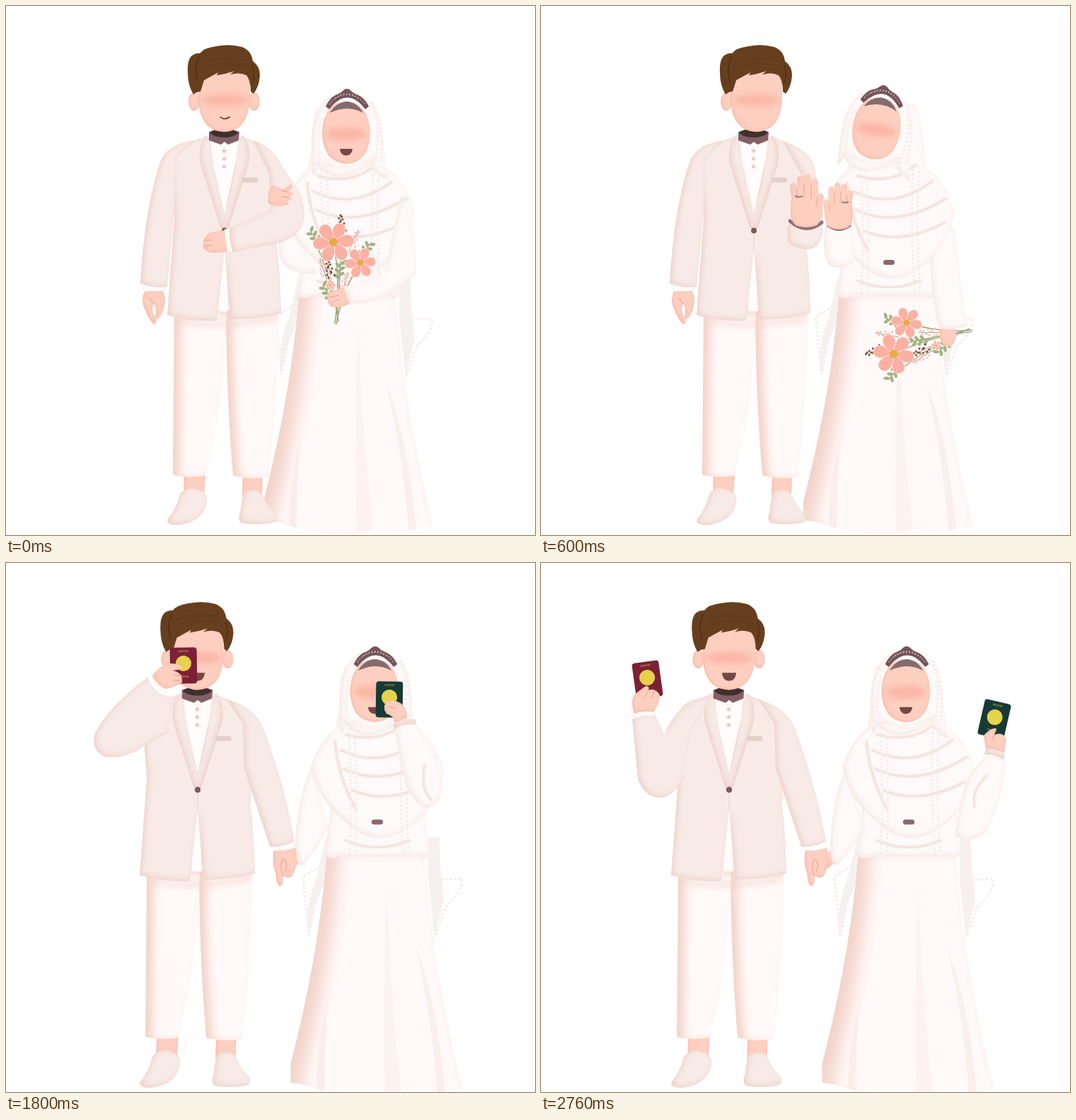
These frames come from a looping animation (748 px wide and 748 px high, 3 s). An HTML page:

```html
<!DOCTYPE html>
<html lang="en">
<head>
<meta charset="utf-8">
<title>Wedding couple</title>
<style>
html, body { margin: 0; width: 100%; height: 100%; overflow: hidden; background: #fff; }
svg { display: block; width: 100vw; height: 100vh; }
.suit { fill: #f8ebe7; filter: url(#suit); }
.pants { fill: #fffaf9; filter: url(#pants); }
.dress { fill: #fffaf9; filter: url(#dress); }
.gown { fill: #fefaf9; filter: url(#gown); }
.skin { fill: #fdcfc0; filter: url(#skin); }
.white { fill: #fffcfb; stroke: #f5e4df; stroke-width: .8; }
.fold { fill: none; stroke: #f3ded8; stroke-width: 3.5; stroke-linecap: round; filter: url(#haze); }
.lace { fill: none; stroke: #f5efed; stroke-width: 4; stroke-linecap: round; stroke-dasharray: 0 6; }
.line { fill: none; stroke: #f0ad9a; stroke-width: 1.3; stroke-linecap: round; }
.blush { fill: #f9a592; opacity: .6; filter: url(#soft); }
.mouth { fill: #764746; }
.gold { fill: #e6d24b; font: 3.6px Inter, sans-serif; text-anchor: middle; }
</style>
</head>
<body>
<svg id="stage" viewBox="0 0 748 748"></svg>
<script>
const path = (kind, d) => `<path class="${kind}" d="${d}"/>`;
const fill = (color, d) => `<path fill="${color}" d="${d}"/>`;
const stroke = (color, width, d) =>
  `<path fill="none" stroke="${color}" stroke-width="${width}" stroke-linecap="round" d="${d}"/>`;
const dot = (x, y, r, color) => `<circle cx="${x}" cy="${y}" r="${r}" fill="${color}"/>`;
const oval = (kind, x, y, rx, ry) => `<ellipse class="${kind}" cx="${x}" cy="${y}" rx="${rx}" ry="${ry}"/>`;
const group = (transform, body) => `<g transform="${transform}">${body}</g>`;
const mirror = (x, body) => body + group(`translate(${2 * x}) scale(-1 1)`, body);

// Soft coloured shadow along the inside edge of a shape
const innerShade = (id, color, dx, dy, blur) => `
  <filter id="${id}" x="-20%" y="-20%" width="140%" height="140%" color-interpolation-filters="sRGB">
    <feOffset in="SourceAlpha" dx="${dx}" dy="${dy}"/><feGaussianBlur stdDeviation="${blur}" result="b"/>
    <feComposite in="SourceAlpha" in2="b" operator="out" result="edge"/>
    <feFlood flood-color="${color}"/><feComposite in2="edge" operator="in" result="tint"/>
    <feMerge><feMergeNode in="SourceGraphic"/><feMergeNode in="tint"/></feMerge>
  </filter>`;

const defs = `<defs>
  ${innerShade('suit', '#ecd0c8', 3, -2, 4)}
  ${innerShade('pants', '#f3cfc4', 9, 4, 7)}
  ${innerShade('dress', '#f3d2c9', 16, 20, 11)}
  ${innerShade('gown', '#f4e4df', 2, -2, 4)}
  ${innerShade('skin', '#f8b7a4', 1, -1, 2)}
  <filter id="soft" x="-30%" y="-80%" width="160%" height="260%"><feGaussianBlur stdDeviation="4"/></filter>
  <filter id="haze"><feGaussianBlur stdDeviation="1"/></filter>
</defs>`;

function passport(x, y, angle, color) {
  return group(`translate(${x} ${y}) rotate(${angle})`, `
    <rect x="-19" y="-25.5" width="38" height="51" rx="4" fill="${color}"/>
    <text class="gold" y="-19">PASPOR</text>${dot(0, -3, 11, '#e6d24b')}
    <text class="gold" y="17">PASPOR</text>`);
}

function palm(x, y, sx, sy) {
  const fingers = 'M-15-34L-18-57M-8-40L-8-67M2-40L2-69M11-38L12-63M17-22L20-42';
  return group(`translate(${x} ${y}) scale(${sx} ${sy})`, `
    <g class="skin">${fill('#fdcfc0', 'M-21-38Q-25-10-15-2Q0 4 15-2Q24-10 23-30L14-44H-14Z')}
    ${stroke('#fdcfc0', 9.5, fingers)}</g>
    ${path('line', 'M-13-40L-13-55M-3-41V-60M7-40V-59M14-28L16-40')}
    ${stroke('#94898f', 2.5, 'M-15-43Q-10-41-6-43')}`);
}

function flower(x, y, r) {
  let petals = '';
  for (let a = 25; a < 385; a += 60)
    petals += `<path d="M0 0C${-r * .5} ${-r * .6} ${-r * .3} ${-r} 0 ${-r}S${r * .5} ${-r * .6} 0 0Z" transform="rotate(${a})"/>`;
  return group(`translate(${x} ${y})`, `<g fill="#fbb0a2" stroke="#fff4f0" stroke-width=".8">${petals}</g>${dot(0, 0, r * .2, '#e2ad43')}`);
}

function sprig(x, y, angle, color) {
  let body = stroke('#b0a381', 1, 'M0 0V32');
  for (let i = 0; i < 13; i++) body += dot(Math.sin(i * 2.4) * (2 + i * .35), i * 2, 1.5, color);
  return group(`translate(${x} ${y}) rotate(${angle})`, body);
}

function leaves(x, y, angle) {
  let body = stroke('#94a26f', 1, 'M0 0V30');
  for (let i = 0; i < 6; i++)
    body += `<ellipse cx="4" rx="4.5" ry="2.3" fill="#a5b285" transform="translate(0 ${i * 4}) rotate(${i % 2 ? 215 : -35})"/>`;
  return group(`translate(${x} ${y}) rotate(${angle})`, body);
}

const bouquet =
  stroke('#99a57a', 1.4, 'M463 340Q474 380 465 449M500 366Q476 400 467 450M474 350L468 447M440 340Q462 390 470 446') +
  leaves(431, 319, -35) + leaves(514, 337, 35) + leaves(473, 365, 8) + leaves(449, 396, -30) +
  sprig(473, 296, -5, '#76513f') + sprig(455, 360, -10, '#76513f') +
  sprig(498, 318, 25, '#eebbc0') + sprig(444, 358, -18, '#f4c4c2') + sprig(483, 377, 15, '#f4c4c2') +
  flower(463, 334, 29) + flower(501, 363, 22) + flower(459, 395, 7);

function groomHead(mouth, turned) {
  const lips = {
    smile: stroke('#5b312a', 1.6, 'M303 157Q309 162 316 157'),
    open: path('mouth', 'M299 154H319Q318 165 309 165.500Q300 165 299 154Z')
  };
  return group(`translate(${turned ? 4 : 0} 0)`,
    oval('skin', 266, 135, 8, 13) + (turned ? '' : oval('skin', 351, 135, 8, 13)) +
    path('skin', 'M272 98V132Q274 177 309 178Q343 176 345 132V95L310 82Z') +
    oval('blush', 309, 133, 33, 8) + (lips[mouth] || '') +
    fill('#673f1e', 'M265 125Q257 112 257 94Q256 76 263 70Q269 66 274 67Q280 59 297 57Q316 53 334 58Q347 63 349 78Q359 85 359 98Q358 114 350 124L346 121Q346 105 340 98Q330 93 317 97Q321 93 323 92Q311 96 298 98L300 94Q287 101 280 105Q277 115 275 121Q270 121 265 125Z') +
    stroke('#512f17', 1.5, 'M273 72Q265 88 271 106M348 84Q353 96 348 109') +
    stroke('#5c371a', 1.2, 'M281 78Q305 70 340 77M277 90Q302 76 342 86'));
}

function groom({ mouth, turned }) {
  return path('skin', 'M252 662H282L280 692H251ZM335 662H363L362 692H334Z') +
    path('suit', 'M246 690Q252 681 264 682Q279 684 284 693Q286 705 278 717Q266 732 241 734Q225 733 229 725Q241 711 246 690Z') +
    path('suit', 'M335 690Q343 683 353 685Q362 687 364 694Q368 706 380 717Q386 728 376 731Q352 735 333 731Q327 727 331 715Z') +
    path('pants', 'M313 430H385Q384 560 371 666Q344 670 321 664Q312 560 311 436Z') +
    path('pants', 'M238 430H312Q308 565 282 664Q257 668 236 663Z') +
    `<path d="M240 442Q300 452 383 438V446Q310 460 240 450Z" fill="#f3d6cd" filter="url(#soft)" opacity=".6"/>` +
    path('white', 'M286 190L309 200L330 190L316 290L314 432H301Z') +
    path('suit', 'M284 184L266 190Q238 195 232 226L238 300L228 437Q262 447 298 445L309 345L317 443Q358 444 389 434Q388 380 383 340L388 240Q385 205 352 191L333 184L309 293Z') +
    mirror(309, path('suit', 'M283 183Q270 198 275 224L303 313L309 318V293Q294 250 289 187Z')) +
    stroke('#eed8d2', 1.5, 'M309 322V345') +
    fill('#836067', 'M287 178Q308 169 330 178L329 190L314 196L309 192L304 196L287 190Z') +
    fill('#40302b', 'M288 179Q308 167 329 179Q322 186 309 186Q294 186 288 179Z') +
    [205, 216, 227].map(y => dot(308.5, y, 2.8, '#e8cfca')).join('') +
    `<rect x="334" y="242.500" width="22" height="7" rx="2" fill="#e5cfca"/>` +
    dot(309, 317.5, 4, '#775a5e') + groomHead(mouth, turned);
}

const restingArm =
  path('white', 'M195 392H226L224 403Q208 405 195 402Z') +
  path('skin', 'M196 404Q190 416 196 428Q201 442 209 450Q215 448 210 439Q205 429 209 421Q214 426 211 439Q211 446 216 441Q224 432 225 417Q225 406 221 403Z') +
  path('line', 'M209 421Q205 414 201 413') +
  path('suit', 'M268 190Q230 194 219 218Q196 285 190 392Q208 400 228 397L238 290L240 215Z');

const holdingArm =
  path('skin', 'M416 400Q412 420 418 434Q419 452 424 452Q430 450 428 438Q439 444 443 434Q450 421 446 399Z') +
  path('line', 'M428 438Q422 420 429 414Q436 420 431 432') +
  path('white', 'M411 392L443 386L444 399Q428 404 413 402Z') +
  path('suit', 'M350 192Q388 200 401 232Q432 315 444 389Q430 398 410 397Q388 330 374 288L372 225Z');

const gownBase =
  fill('#f6f1ef', 'M413 384H428Q416 440 398 480L388 522Q383 480 400 440Z') +
  fill('#f6f1ef', 'M556 384H572Q572 430 578 470L565 526Q560 480 556 440Z') +
  path('lace', 'M404 425L381 440L390 520L398 480') +
  path('lace', 'M552 444L603 442Q604 460 580 482L566 524') +
  path('dress', 'M416 380Q408 530 364 700V727Q384 729 398 735Q440 743 470 748Q505 746 520 740Q560 745 604 735Q588 670 575 600Q558 510 548 380Z') +
  fill('#fbeeea', 'M416 610Q398 690 400 735L411 739Q411 680 416 610Z') +
  fill('#fcf3f0', 'M498 450Q492 600 495 745L519 740Q503 600 498 450Z') +
  fill('#fbefeb', 'M538 535Q562 640 569 742L580 740Q568 610 538 535Z') +
  path('gown', 'M425 300L412 408Q416 416 430 411H540Q556 415 556 406L550 300Z') +
  path('fold', 'M440 388Q485 408 530 388');

const shawl =
  path('gown', 'M440 145Q430 170 432 205L424 246Q480 290 539 250Q536 220 533 185Q530 150 520 138Z') +
  path('gown', 'M434 226Q405 245 392 285Q400 330 440 362Q485 404 530 370Q570 340 578 290Q565 245 533 225Z') +
  path('fold', 'M440 240Q490 254 523 224M434 262Q490 290 546 248M438 288Q495 316 566 272M450 318Q500 340 564 306M426 250Q430 300 455 345') +
  `<rect x="477" y="359" width="16" height="7" rx="3.500" fill="#8d686b"/>`;

function brideHead(mouth) {
  return path('gown', 'M434 240Q432 220 433 182Q437 124 482 121Q526 124 533 182Q534 222 540 246Q514 236 515 215Q485 250 446 222Z') +
    path('lace', 'M446 160Q438 190 444 225M518 138Q531 170 522 225M527 160Q534 195 529 225') +
    path('skin', 'M447 178Q450 136 481 135Q512 136 515 178Q514 222 481 223Q448 221 447 178Z') +
    fill('#856b6e', 'M458 151Q467 136 482 135Q497 136 505 151Q483 139 458 151Z') +
    oval('blush', 481, 181, 29, 9) +
    (mouth ? path('mouth', 'M472 202H490Q489 211 481 211.500Q473 211 472 202Z') : '') +
    path('gown', 'M437 219Q478 240 524 211Q512 236 470 242Q445 238 437 219Z') +
    fill('#735459', 'M452 142Q458 130 466 126Q474 123 476 120Q482 114 488 120Q490 123 498 126Q507 130 513 142L508 146Q483 113 457 146Z') +
    `<path d="M457 139Q482 109 508 139M465 131Q482 120 499 131" fill="none" stroke="#c9b4b5" stroke-width="1.600" stroke-dasharray="1.600 2.600"/>`;
}

const veilLace = path('lace', 'M445 232Q450 320 446 406M453 235Q458 320 454 408M519 232Q515 320 522 408M527 235Q523 320 529 406');

const brideLowArm =
  path('skin', 'M402 412L414 404L420 420L405 432Z') +
  path('gown', 'M432 290Q413 325 409 395Q409 430 419 427Q440 408 456 372Z');

const maroon = '#7c2036', green = '#173a36';
const foldedHand = 'M272 293Q285 284 300 288Q311 292 309 305Q306 318 295 320L283 317Z';

// groom, bride: body axis; under: below the shawl; gown: bride's arms; suit: groom's arms (body space); front: on top
const poses = [
  {
    groom: 309, bride: 485, mouth: 'smile', brideMouth: true,
    under: path('gown', 'M398 300Q378 340 390 362Q405 382 440 378Z'),
    gown: bouquet +
      path('skin', 'M484 396Q468 400 456 405Q451 417 460 425Q474 429 488 419Z') + path('line', 'M458 412L470 409M460 419L472 415') +
      path('gown', 'M558 270Q582 310 580 378Q558 400 528 414Q502 424 486 419L477 397Q514 391 536 372Z'),
    suit: restingArm +
      path('skin', 'M314 318Q300 316 288 321Q277 327 279 342Q283 349 296 349L314 347Z') + path('line', 'M281 331H291M281 339H291') +
      path('white', 'M309 316L319 314L323 346L313 348Z') +
      path('suit', 'M350 191Q375 197 388 222L416 265Q431 305 408 324Q396 334 372 338L321 348Q315 332 316 314L374 288L372 238Z'),
    front: path('skin', 'M371 279Q369 260 377 254Q387 256 391 260L403 252Q408 255 400 262L407 266L400 269L405 273L397 276L400 280Q386 286 371 279Z') +
      path('line', 'M390 261L399 263M390 270H400')
  },
  {
    groom: 301, bride: 492, turned: true, brideTurned: true,
    under: group('translate(106 56) rotate(-105 467 412)', bouquet) +
      path('skin', 'M564 457Q562 474 571 481Q583 484 587 468L586 454Z') +
      path('gown', 'M554 300L585 315Q592 380 603 452Q586 460 564 456Q550 410 550 340Z'),
    gown: path('gown', 'M402 308Q396 350 407 366Q423 375 440 364Q445 340 440 308Z') +
      stroke('#8c747a', 3, 'M406 311Q421 322 437 311') + palm(421, 315, -.88, .88),
    suit: restingArm +
      path('suit', 'M350 192Q384 200 394 224L406 290Q412 334 392 343Q372 346 358 335Q354 322 359 303L385 300L376 238Z') +
      stroke('#8c747a', 5, 'M360 304Q382 324 405 306') + palm(383, 312, 1, 1)
  },
  {
    groom: 303, bride: 490, mouth: 'open', brideMouth: true,
    gown: passport(487, 298, 0, green) +
      mirror(486.5, path('gown', 'M424 250Q398 285 384 355Q386 386 418 384Q446 372 469 346L455 324L425 330L438 275Z') +
        path('suit', 'M453 325L460 320L473 342L466 348Z') +
        path('skin', 'M459 320Q472 307 483 311Q492 317 488 328Q481 340 472 341Z') + path('line', 'M477 322L486 320M476 329L486 327')),
    suit: passport(309, 275.5, 0, maroon) +
      mirror(309, path('white', 'M267 296L275 292L286 318L279 324Z') + path('skin', foldedHand) +
        path('line', 'M295 300L306 298M294 308L305 306') +
        path('suit', 'M268 190Q228 194 218 220Q196 270 186 325Q186 355 210 354Q245 348 281 322Q272 310 270 296L232 302L236 215Z'))
  },
  {
    groom: 271, bride: 525, scale: 1.012, mouth: 'open', brideMouth: true, under: brideLowArm,
    gown: passport(542, 193, 1, green) +
      path('gown', 'M549 230Q562 222 580 227Q608 262 618 312Q614 350 590 346Q566 330 559 285Z') +
      path('fold', 'M592 285Q585 320 602 335') + path('suit', 'M547 229Q560 219 579 221L580 228Q560 227 549 235Z') +
      path('skin', 'M538 213Q531 202 540 195Q550 193 559 199Q568 207 567 219Q558 222 550 226Q549 216 538 213Z') + path('line', 'M540 203L550 205'),
    suit: holdingArm,
    front: passport(251, 145, -1, maroon) +
      path('suit', 'M236 190L224 187Q210 181 200 162Q148 200 126 240Q119 264 140 274Q172 278 202 254L230 240Z') +
      path('white', 'M200 162L206 159Q213 175 227 181L224 188Q207 181 200 162Z') +
      path('skin', 'M207 160Q216 145 232 142Q248 142 250 150L236 152Q250 155 249 169Q240 175 226 178Q214 173 207 160Z') + path('line', 'M237 159H248M237 166H248')
  },
  {
    groom: 266, bride: 520, scale: 1.012, mouth: 'open', brideMouth: true, under: brideLowArm,
    gown: passport(641, 221, 13, green) +
      path('gown', 'M606 300L628 273Q644 270 657 280Q655 330 630 380Q612 398 586 386Q592 330 606 300Z') +
      path('fold', 'M631 300Q608 322 613 345') + path('suit', 'M629 262Q645 262 656 270L654 278Q642 270 627 271Z') +
      path('skin', 'M629 262L626 244Q637 232 644 234L641 243Q654 238 658 250L655 268Q643 262 629 262Z') + path('line', 'M641 243Q636 250 642 254'),
    suit: holdingArm,
    front: passport(150.5, 165, -8, maroon) +
      path('suit', 'M240 190Q208 194 191 214Q181 226 174 242L161 214Q145 212 129 221L137 305Q146 332 170 332Q189 328 198 308L212 240Z') +
      path('white', 'M131 213Q145 207 160 211V217Q145 214 132 220Z') +
      path('skin', 'M132 213Q126 196 132 186L148 174Q154 174 152 180Q162 176 168 187Q167 202 159 210Q145 208 132 213Z') + path('line', 'M152 180L146 190M160 181L157 190')
  }
];

function scene(pose) {
  const scale = pose.scale || 1;
  const place = (axis, x, body) => group(`translate(${x} 55) scale(${scale}) translate(${-axis} -55)`, body);
  const turn = pose.brideTurned ? 'translate(-14 -6) rotate(9 481 182)' : '';
  return '<g visibility="hidden">' +
    place(485, pose.bride, gownBase) + (pose.under || '') +
    place(485, pose.bride, shawl + group(turn, brideHead(pose.brideMouth)) + veilLace) + pose.gown +
    place(309, pose.groom, groom(pose) + pose.suit) + (pose.front || '') + '</g>';
}

const stage = document.getElementById('stage');
stage.innerHTML = defs + poses.map(scene).join('');
const scenes = [...stage.children].slice(1);

function tick() {
  const current = Math.floor(performance.now() % 3000 / 600);
  scenes.forEach((s, i) => s.setAttribute('visibility', i === current ? 'visible' : 'hidden'));
  requestAnimationFrame(tick);
}
tick();
</script>
</body>
</html>
```
